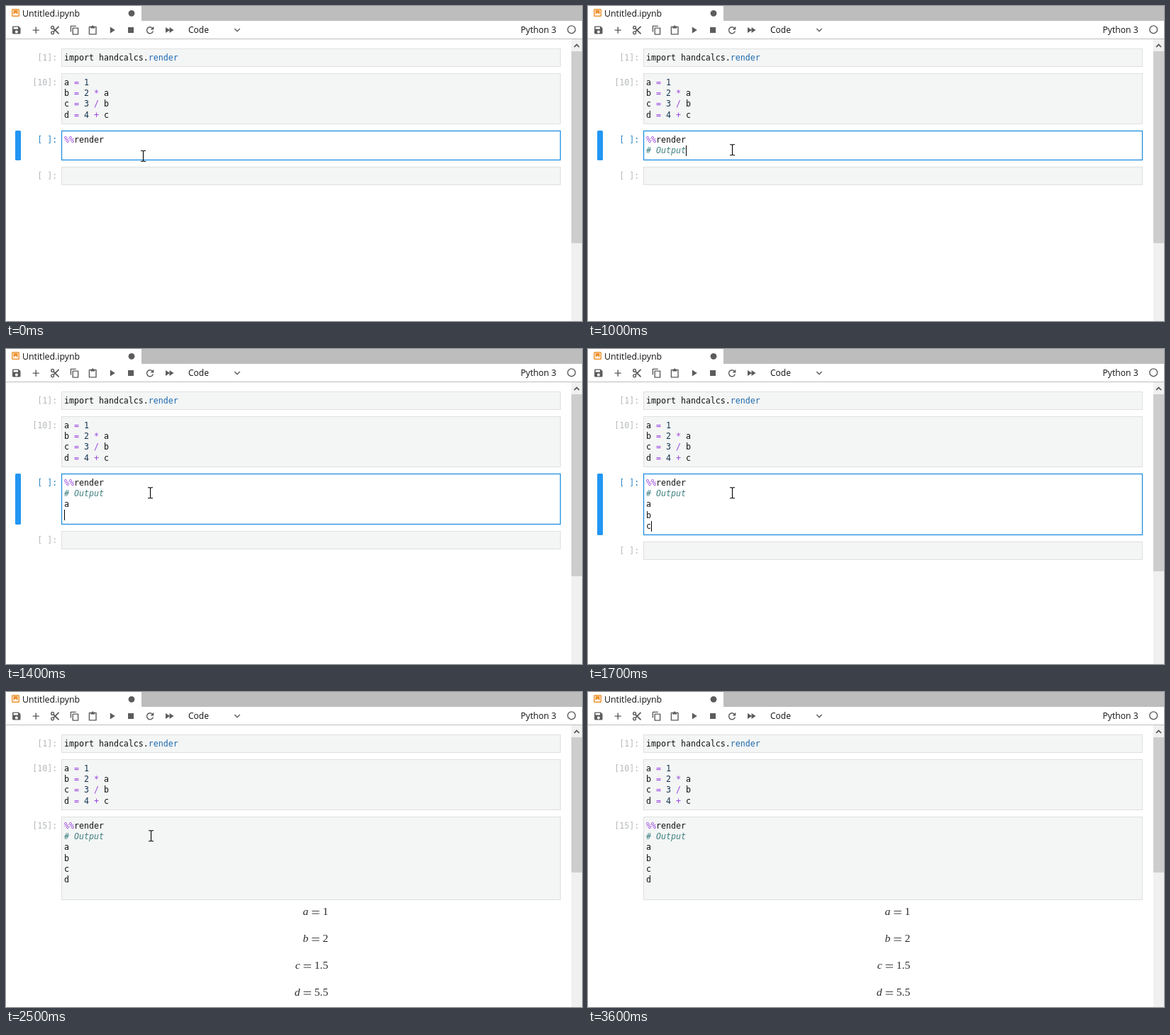
These frames come from a looping animation (812 by 445 pixels, 3900 ms). An HTML page:

```html
<!DOCTYPE html>
<html lang="en">
<head>
<meta charset="utf-8">
<title>Notebook</title>
<style>
  html, body { margin: 0; width: 100%; height: 100%; overflow: hidden; background: #fff; }
  svg { display: block; }
  text { white-space: pre; }
  .ui { font-family: "Open Sans", "Noto Sans", sans-serif; fill: #111; }
  .code { font: 11.627px "DejaVu Sans Mono", "Liberation Mono", monospace; fill: #111; }
  .op { fill: #9a45df; }
  .num { fill: #15354f; }
  .prop { fill: #1b68ad; }
  .comment { fill: #408080; font-style: italic; }
  .prompt { fill: #b4b8ba; text-anchor: end; }
  .active { fill: #2482c4; }
  .cell { fill: #f4f5f5; stroke: #e0e0e0; }
  .cell.editing { fill: #fff; stroke: #1f8fe0; stroke-width: 1.3; }
  .math { font: 15.6px "Liberation Serif", "Noto Serif", serif; fill: #2c2c2c; }
  .math .var { font-style: italic; }
  .solid { fill: #5c5c5c; }
  .line { fill: none; stroke: #5c5c5c; stroke-width: 1.4; }
</style>
</head>
<body>
<svg id="stage" width="812" height="445" viewBox="0 0 812 445">
  <rect width="812" height="445" fill="#fff"/>
  <rect x="191" width="621" height="21" fill="#bdbdbd"/>
  <rect x="8.7" y="4.7" width="9.6" height="9.6" rx=".8" fill="none" stroke="#ee922f" stroke-width="1.4"/>
  <path d="M10.5 6H16.5V12L13.5 9.8L10.5 12Z" fill="#ee922f"/>
  <circle class="solid" cx="177" cy="10.3" r="4.4"/>
  <g class="ui">
    <text x="23" y="15" font-size="12.35">Untitled.ipynb</text>
    <text x="257" y="38" font-size="12">Code</text>
    <text x="725.5" y="38" font-size="12.2">Python 3</text>
  </g>

  <g id="toolbar">
    <path class="solid" fill-rule="evenodd" d="M10.3 28.5H17.8L20.5 31.2V38.2Q20.5 39.5 19.2 39.5H10.3Q9 39.5 9 38.2V29.8Q9 28.5 10.3 28.5ZM10.5 29.8V32.5H17V29.8ZM14.8 34.4a2 2 0 1 0 .1 0Z"/>
    <path class="line" d="M42.2 29.5V38.7M37.6 34.1H46.8"/>
    <g class="line">
      <circle cx="65.6" cy="30.4" r="1.9"/>
      <circle cx="65.6" cy="37.8" r="1.9"/>
      <path d="M67 31.8L74.5 39.3M67 36.4L74.5 28.9" stroke-width="1.8"/>
    </g>
    <path class="line" d="M91.4 36.6V28.4H98.8M94.2 31.1H101.6V40.1H94.2Z" stroke-linejoin="round"/>
    <path class="line" d="M117.4 29.4H127V39.9H117.4Z" stroke-linejoin="round"/>
    <path class="solid" d="M119.2 29H125.2V31.6H119.2ZM120.8 29a1.4 1.4 0 0 1 2.8 0Z"/>
    <path class="solid" d="M146.8 29.6L153.8 34.1L146.8 38.6Z"/>
    <rect class="solid" x="172" y="30" width="8" height="8"/>
    <path class="line" d="M206.4 31.2A4.5 4.5 0 1 0 207.4 35.4"/>
    <path class="solid" d="M208.3 28.7V33.5H203.5Z"/>
    <path class="solid" d="M225 30L231 34L225 38ZM230.5 30L236.5 34L230.5 38Z"/>
    <path class="line" d="M322.3 32L326 35.7L329.7 32" stroke-width="1.3"/>
    <circle class="line" cx="797.2" cy="33.3" r="5.4" stroke-width="1.2"/>
  </g>
  <rect y="46" width="812" height="1" fill="#bdbdbd"/>

  <rect x="797" y="47" width="15" height="398" fill="#f0f0f0"/>
  <path d="M801 58L804.5 54.5L808 58" fill="none" stroke="#505050" stroke-width="1.7"/>
  <rect id="thumb" x="797" y="64" width="15" fill="#cdcdcd"/>

  <g id="fixedCells"></g>
  <rect id="marker" x="13" y="176" width="8" rx="1.5" fill="#2196f3"/>
  <rect id="editor" x="78.5" y="176.5" width="703"/>
  <text id="editorPrompt" x="72.3" y="193"></text>
  <g id="source"></g>
  <rect id="caret" width="1" height="15" fill="#000"/>
  <g id="nextCell">
    <rect class="cell" x="78.5" y=".5" width="703" height="25"/>
    <text class="code prompt" x="72.3" y="16.5">[ ]:</text>
  </g>
  <g id="output" class="math"></g>
  <path id="beam" d="M-3.5 -7.5H-1L0 -6.8L1 -7.5H3.5M0 -7V7M-3.5 7.5H-1L0 6.8L1 7.5H3.5" fill="none" stroke="#000" stroke-width="1.1"/>
  <path id="arrow" d="M0 0V16L3.7 12.5L6.2 18.3L8.5 17.3L6 11.6H11.3Z" fill="#fff" stroke="#000"/>
</svg>

<script>
const LOOP = 3900, RUN_AT = 2100;
const CHAR = 7, LINE = 15.2, LEFT = 82;

// [start in ms, text typed below the first line]
const typing = [
  [0, ""], [400, "#"], [500, "# "], [600, "# O"], [700, "# Ou"],
  [900, "# Outp"], [1000, "# Output"], [1200, "# Output\n"],
  [1300, "# Output\na"], [1400, "# Output\na\n"], [1500, "# Output\na\nb"],
  [1600, "# Output\na\nb\n"], [1700, "# Output\na\nb\nc"],
  [1800, "# Output\na\nb\nc\nd"], [1900, "# Output\na\nb\nc\nd\n"]
];

// [start in ms, shape, x, y]
const pointer = [
  [0, "beam", 193.5, 212], [100, "beam", 198.5, 207], [200, "beam", 203.5, 203.3],
  [2500, "beam", 204.5, 203.3], [3400, "beam", 330.5, 268],
  [3500, "arrow", 635.5, 428], [3600, "none", 0, 0]
];

const $ = id => document.getElementById(id);
const at = (steps, t) => steps.filter(step => step[0] <= t).pop();
const show = (el, on) => el.setAttribute("visibility", on ? "visible" : "hidden");
const set = (el, attrs) => {
  for (const name in attrs) el.setAttribute(name, attrs[name]);
};

function highlight(line) {
  const token = /(#.*)|(%%|[=*\/+])|(\b\d+)|((?<=\.)\w+)/g;
  return line.replace(token, (word, comment, op, num) => {
    const kind = comment ? "comment" : op ? "op" : num ? "num" : "prop";
    return `<tspan class="${kind}">${word}</tspan>`;
  });
}

const codeLines = (text, y) => text.split("\n").map((line, i) =>
  `<text class="code" x="${LEFT}" y="${y + i * LINE}">${highlight(line)}</text>`).join("");

const cell = (y, height, prompt, text) =>
  `<rect class="cell" x="78.5" y="${y + .5}" width="703" height="${height}"/>
   <text class="code prompt" x="72.3" y="${y + 17}">[${prompt}]:</text>${codeLines(text, y + 17)}`;

function equation([name, value], i) {
  const y = 315.3 + i * 38;
  const numberLeft = 454.3 - (value.length > 1 ? 19.5 : 7.8);
  const signLeft = numberLeft - 15.2;
  return `<text class="var" x="${signLeft - 5}" y="${y}" text-anchor="end">${name}</text>
    <path d="M${signLeft} ${y - 5.8}h10.4m0 3.6h-10.4" stroke="#2c2c2c" stroke-width=".9"/>
    <text x="${numberLeft}" y="${y}">${value}</text>`;
}

$("fixedCells").innerHTML =
  cell(60, 25, "1", "import handcalcs.render") +
  cell(95, 71, "10", "a = 1\nb = 2 * a\nc = 3 / b\nd = 4 + c");
$("output").innerHTML =
  [["a", "1"], ["b", "2"], ["c", "1.5"], ["d", "5.5"]].map(equation).join("");

let shownSource = null;

function draw(t) {
  const done = t >= RUN_AT;
  const text = "%%render\n" + at(typing, t)[1];
  const lines = text.split("\n");
  // The empty second line is already there before typing begins.
  const extra = lines.length - 2;
  const bottom = Math.round(217.6 + extra * LINE);

  if (text !== shownSource) {
    $("source").innerHTML = codeLines(text, 193);
    shownSource = text;
  }

  set($("editor"), { class: done ? "cell" : "cell editing", height: bottom - 177 });
  set($("editorPrompt"), { class: done ? "code prompt" : "code prompt active" });
  $("editorPrompt").textContent = done ? "[15]:" : "[ ]:";
  set($("marker"), { height: bottom - 176 });
  show($("marker"), !done);

  set($("caret"), {
    x: LEFT + lines.at(-1).length * CHAR,
    y: Math.round(197 + extra * LINE)
  });
  show($("caret"), t >= 100 && !done);

  set($("nextCell"), { transform: `translate(0 ${bottom + 9})` });
  show($("nextCell"), !done);
  show($("output"), done);
  set($("thumb"), { height: (done ? 255 : 335 - Math.round(extra * 6.9)) - 64 });

  const [, shape, x, y] = at(pointer, t);
  for (const id of ["beam", "arrow"]) {
    show($(id), id === shape);
    set($(id), { transform: `translate(${x} ${y})` });
  }
}

const start = performance.now();
function tick() {
  draw((performance.now() - start) % LOOP);
  requestAnimationFrame(tick);
}
tick();
</script>
</body>
</html>
```
